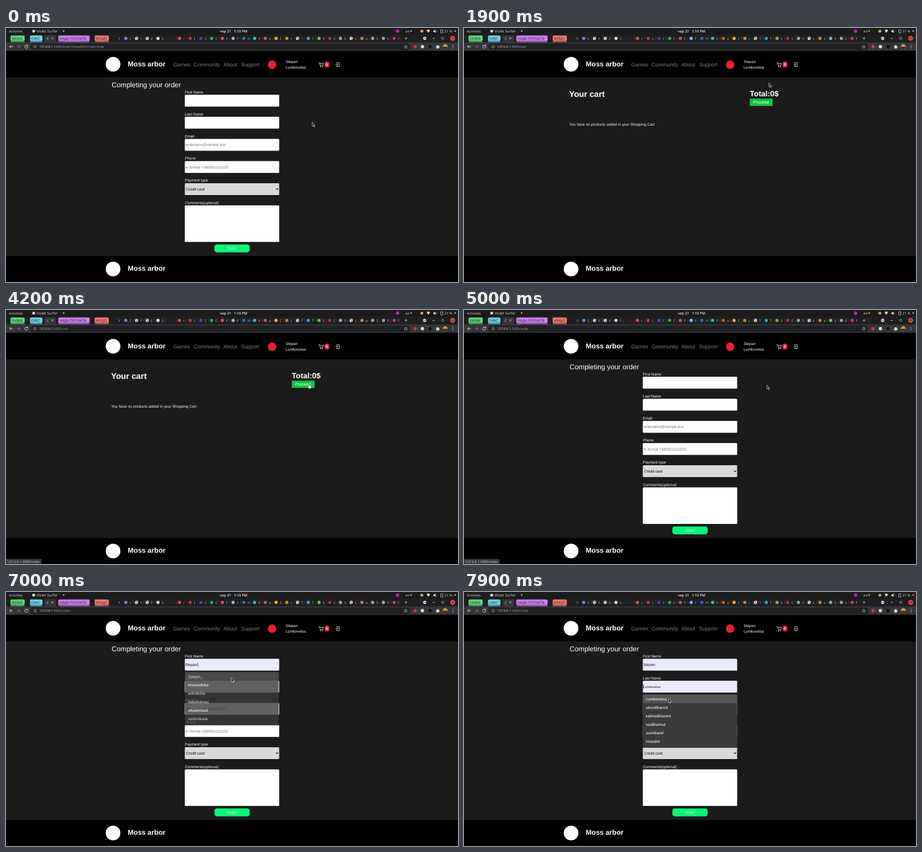
An HTML page that plays this animation: 800 by 450 pixels, repeating every 8000 ms.

```html
<!DOCTYPE html>
<html lang="en">
<head>
<meta charset="utf-8">
<title>Order form</title>
<style>
html, body { margin: 0; width: 100%; height: 100%; overflow: hidden; background: #000; }
svg { display: block; width: 100vw; height: 100vh; }
text { font-family: "Liberation Sans", Arial, sans-serif; white-space: pre; text-rendering: geometricPrecision; }
.ui { font-family: "Open Sans", "Noto Sans", sans-serif; }
</style>
</head>
<body>
<svg id="stage" viewBox="0 0 800 450"></svg>
<script>
const LOOP = 8000;
const FIRST = "Stepan", LAST = "Lumkovetsa", SHOP = "Moss arbor";
const stage = document.getElementById("stage");

const rect = (x, y, w, h, fill, r = 0, extra = "") =>
  `<rect x="${x}" y="${y}" width="${w}" height="${h}" rx="${r}" fill="${fill}" ${extra}/>`;
const disc = (x, y, r, fill) => `<circle cx="${x}" cy="${y}" r="${r}" fill="${fill}"/>`;
const text = (x, y, size, fill, s, extra = "") =>
  `<text x="${x}" y="${y}" font-size="${size}" fill="${fill}" ${extra}>${s}</text>`;
const ui = (x, y, size, fill, s, extra = "") => text(x, y, size, fill, s, 'class="ui" ' + extra);
const line = (d, color, w = 1, extra = "") =>
  `<path d="${d}" fill="none" stroke="${color}" stroke-width="${w}" ${extra}/>`;
const shape = (d, fill) => `<path d="${d}" fill="${fill}"/>`;
const group = (id, body) => `<g id="${id}">${body}</g>`;
const bold = 'font-weight="700"', semi = 'font-weight="600"';

function desktopBar() {
  return rect(0, 0, 800, 12, "#1b1b1b") +
    ui(5, 8, 6, "#ddd", "Activities") +
    disc(49, 5.5, 2.6, "#d9d9d9") +
    ui(54, 8, 6.5, "#ddd", "Violet Surfer") +
    shape("M100 4.5h4l-2 2.6z", "#ccc") +
    ui(378, 8, 6.3, "#eee", "чер 21   1:10 PM", semi) +
    disc(693, 5.5, 3, "#c01fd0") +
    ui(707, 8, 6.2, "#ddd", "en") + shape("M715 4.5h4l-2 2.6z", "#ccc") +
    disc(736, 5.5, 2.6, "#e8a33d") +
    shape("M744.5 4q3-2.4 6 0l-3 4.4z", "#eee") +
    shape("M756.5 4.6h1.5l2-1.8v6l-2-1.8h-1.5z", "#eee") +
    line("M761.3 3.6q1.6 2 0 4", "#ddd", .7) +
    rect(769.5, 3, 3.6, 6, "none", .6, 'stroke="#ddd" stroke-width=".8"') +
    ui(776, 8, 6.2, "#ddd", "21 %") + shape("M793 4.5h4l-2 2.6z", "#ccc");
}

const globe = (x, y) => disc(x, y, 2.8, "#eee") +
  shape(`M${x - 2} ${y - 1.2}l2-.8 .6 1.2-1.2 1zM${x + .2} ${y + .4}l1.8-.4-.6 1.8-1 .4z`, "#444");

function tabStrip() {
  const labels = [
    [8, 25, "#5fd577", "КАЗКА"], [42.5, 22, "#6ad3ec", "ОФІС"],
    [92.5, 55.5, "#cf7df0", "НАДА ПРОЧИТА"], [157, 25, "#ee7770", "КІНЦО"]
  ];
  const letters = "CYES-rLCCFFHVaCcTTSCSLaSEF";
  const colors = ("#5b8def #eee #eee #ddd #222 #e0533d #c92f3c #5b36c9 #31a866 #e0533d #8ab4f8 #3b5fd9 " +
    "#2fc4b2 #e0533d #f5b02e #d9822b #eee #2ca5e0 #7fba3c #d0212b #8fae96 #eee #d9822b #8fae96 #8fae96 #d9305f").split(" ");
  let s = rect(0, 12, 800, 14, "#1e1f21") + rect(68, 12.5, 20.5, 14, "#35363a", 2);
  for (const [x, w, c, label] of labels)
    s += rect(x, 13.2, w, 10, c, 2) + rect(x, 24, w, 1, c) + ui(x + 2, 20.8, 6.3, "#222", label);
  s += ui(72, 20.6, 6, "#ddd", "C") +
    line("M80.3 16.5l3.4 3.4m0-3.4l-3.4 3.4", "#ddd", .8) + ui(199, 20.6, 6, "#bbb", "Y");
  [...letters].forEach((ch, i) => {
    const x = 212 + i * 19;
    s += (colors[i] === "#eee" ? globe(x, 18.4) : disc(x, 18.4, 2.8, colors[i])) + ui(x + 6.5, 20.6, 6, "#bbb", ch);
    if (i) s += rect(x - 6, 15.5, .5, 6, "#555");
  });
  return s + line("M705.5 18.4h5m-2.5-2.5v5", "#ccc", .8) +
    disc(741, 18.4, 2.8, "#ddd") + rect(739.6, 17.9, 2.8, 1, "#333") +
    line("M755 18.6h4", "#ddd", .8) + line("M773 16l2.4 2.4-2.4 2.4-2.4-2.4z", "#ddd", .8) +
    disc(790.5, 18.4, 4.4, "#e0463a") + line("M789 16.9l3 3m0-3l-3 3", "#222", .8);
}

function toolbar() {
  return rect(0, 25.5, 800, 15, "#35363a") + rect(43, 27.5, 673, 11.3, "#202124", 5.6) +
    line("M12 33H6.5m2.6-2.7L6.4 33l2.7 2.7", "#ddd") +
    line("M19.5 33H25m-2.6-2.7L25.1 33l-2.7 2.7", "#777") +
    group("reload", line("M38.2 31.6a2.7 2.7 0 1 0 .3 2.2M38.6 29.8v2.2h-2.2", "#ddd")) +
    group("stop", line("M33.6 30.8l4.4 4.4m0-4.4l-4.4 4.4", "#ddd")) +
    `<circle cx="51.5" cy="33" r="2.5" fill="none" stroke="#aaa" stroke-width=".8"/>` + rect(51.1, 32.6, .8, 2, "#aaa") +
    `<text class="ui" x="59" y="35.2" font-size="5.7" fill="#eee">127.0.0.1<tspan id="url" fill="#9aa0a6"></tspan></text>` +
    line("M707.5 30.2l.9 1.9 2 .2-1.5 1.4.4 2.1-1.8-1-1.8 1 .4-2.1-1.5-1.4 2-.2z", "#ccc", .7) +
    disc(724, 33, 3, "#d8332c") + disc(737, 33, 3, "#e3d9d9") + disc(750.5, 33, 2.9, "#111") +
    shape("M761.5 31.3h1.6q.9-2.6 1.8 0h1.6v1.6q2.4.9 0 1.8v1.6h-5z", "#ddd") +
    disc(777.5, 33, 4.4, "#c9964f") + shape("M773.3 33.5h8.4a4.3 4.3 0 0 1-8.4 0z", "#2b2420") +
    [30.5, 33, 35.5].map(y => disc(791, y, .7, "#ddd")).join("");
}

function header() {
  const links = [[296, "Games"], [332, "Community"], [385, "About"], [416, "Support"]];
  return rect(0, 40.5, 800, 47, "#000") + disc(189.5, 64.3, 13, "#fff") +
    text(215.5, 67.5, 12.4, "#fff", SHOP, bold) +
    links.map(([x, s]) => text(x, 67.6, 9.3, "#7f7f7f", s)).join("") +
    disc(471, 65, 7.5, "#e0232e") +
    text(495, 62, 6.7, "#fff", FIRST) + text(495, 72, 6.7, "#fff", LAST) +
    line("M553 61.3h1.7l1.5 5h4.6l1-3.7h-6.6", "#fff", .8) + disc(556.8, 68.5, .9, "#fff") + disc(560.3, 68.5, .9, "#fff") +
    rect(563.7, 59.5, 8.7, 10.6, "#dc1f35", 3.5) + text(568, 67.4, 7, "#fff", "0", bold + ' text-anchor="middle"') +
    line("M585.3 63.3v-1.6h4.6v6.8h-4.6v-1.6M583.4 65.1h4m-1.4-1.5l1.5 1.5-1.5 1.5", "#fff", .8);
}

function orderPage() {
  const field = (id, y, h, fill = "#fffffd") => rect(316.5, y, 167, h, fill, 1.5, `id="${id}"`);
  const labels = ["First Name", "Last Name", "Email", "Phone", "Payment type", "Comments(optional)"];
  return text(187, 105, 12.4, "#fff", "Completing your order") +
    labels.map((s, i) => text(316.7, 115.5 + i * 39.2, 6.67, "#fff", s)).join("") +
    field("first", 118.2, 21) + field("last", 157.3, 21) + field("mail", 196.5, 21) + field("phone", 235.7, 21) +
    field("pay", 275, 21, "#d9d9d7") + field("notes", 314.2, 64.8) +
    text(317.5, 209.4, 6.67, "#757575", "writename@sample.test") +
    text(317.5, 248.5, 6.67, "#757575", "In format +380001112233") +
    text(319, 288, 6.67, "#000", "Credit card") + line("M477.8 284.4l2 2 2-2", "#111", 1.1) +
    rect(368.8, 383.4, 62.6, 14, "#0df477", 4.5) + text(400, 392.7, 6.8, "#d9ffe9", "Order", 'text-anchor="middle"') +
    text(317.3, 130.8, 6.67, "#111", FIRST, 'id="firstText"') +
    text(317.8, 170.2, 5.5, "#111", LAST, 'id="lastText"') +
    rect(0, 0, .6, 7, "#000", 0, 'id="caret"');
}

function cartPage() {
  return text(186, 121.8, 14.6, "#fff", "Your cart", bold) + text(505.8, 120.8, 13.6, "#fff", "Total:0$", bold) +
    rect(505.8, 125.2, 40.4, 12.8, "#0dc640") + text(511.8, 134.2, 7.5, "#fff", "Proceed") +
    text(186.3, 172.7, 6.67, "#fff", "You have no products added in your Shopping Cart");
}

function popup(id, x, y, w, items) {
  return group(id, rect(x, y, w, 95, "#3a3a3a") +
    rect(x, y + 1, w, 15, "#565656", 0, `id="${id}Hover"`) +
    items.map((s, i) => ui(x + 5.3, y + 11 + i * 15, 6.4, "#f4f4f4", s, semi)).join(""));
}

stage.innerHTML = rect(0, 0, 800, 450, "#1c1b1a") + desktopBar() + tabStrip() + toolbar() + header() +
  rect(0, 404, 800, 46, "#000") + disc(189.5, 427, 13, "#fff") + text(215.5, 430, 12.4, "#fff", SHOP, bold) +
  group("order", orderPage()) + group("cart", cartPage()) +
  popup("firstList", 317, 141.3, 165.6, [FIRST, "kmasndnka", "adkslkdsk", "lsakdkdmas", "alksdmlasd", "asldmlkads"]) +
  popup("lastList", 316.4, 181, 167.2, [LAST, "aksndlkansd", "kalmsdklasdm", "lasdlkamsd", "asmldasld", "lmasdld"]) +
  group("status", rect(-2, 441, 0, 11, "#35363a", 1.5, 'id="statusBox"') + ui(2, 447.5, 6, "#e4e4e4", "", 'id="statusText"')) +
  group("arrow", `<path d="M0 0v7l1.6-1.4 1.2 2.6 1.3-.6-1.2-2.5h2.2z" fill="#111" stroke="#eee" stroke-width=".7"/>`) +
  group("hand", `<path d="M-1-2.5q.9-1 1.6 0v3l3 .6q1.2.5.9 2.2l-.7 2.9h-3.9l-2.7-3.2q-.2-1.2 1.8 0z" fill="#fff" stroke="#111" stroke-width=".5"/>`) +
  group("beam", line("M-1.5-3.5q1.5 0 1.5 1v5q0 1-1.5 1M1.5-3.5q-1.5 0-1.5 1m0 5q0 1 1.5 1", "#444", .8));

const el = id => document.getElementById(id);
const show = (id, on) => el(id).setAttribute("display", on ? "inline" : "none");

// time, x, y
const path = [
  [500, 542, 167], [900, 551, 110], [1200, 559, 67], [1650, 559, 67], [2000, 535, 105],
  [2500, 472, 183], [3000, 440, 206], [3300, 437, 200], [3500, 437, 200], [3900, 500, 160],
  [4200, 536, 133], [5000, 536, 133], [5500, 490, 140], [6100, 432, 128], [6500, 430, 128],
  [6800, 402, 150], [7000, 399, 152], [7300, 368, 168], [7600, 367, 168], [7800, 362, 189]
];

function pointer(t) {
  const i = path.findIndex(p => p[0] > t);
  if (i < 0) return path[path.length - 1].slice(1);
  if (!i) return path[0].slice(1);
  const [a, b] = [path[i - 1], path[i]];
  const k = (t - a[0]) / (b[0] - a[0]), e = k * k * (3 - 2 * k);
  return [a[1] + (b[1] - a[1]) * e, a[2] + (b[2] - a[2]) * e];
}

function draw(time) {
  const t = Math.floor(time % LOOP / 100) * 100;
  const between = (a, b) => t >= a && t < b;
  const onCart = between(1700, 4900);
  const [x, y] = pointer(t);
  const inside = (l, top, r, bottom) => x >= l && x <= r && y >= top && y <= bottom;

  show("cart", onCart);
  show("order", !onCart);
  const loading = between(1500, 1800) || between(4400, 5000);
  show("stop", loading);
  show("reload", !loading);
  el("url").textContent = ":5000/" + (onCart ? "cart" : t < 1700 ? "order?showAlertOrder=true" : "order");

  const toCart = between(1200, 1900), toOrder = between(4100, 5400);
  show("status", toCart || toOrder);
  el("status").setAttribute("opacity", t === 1200 ? .6 : 1);
  el("statusText").textContent = "127.0.0.1:5000/" + (toCart ? "cart" : "order");
  el("statusBox").setAttribute("width", toCart ? 60 : 65);

  show("firstList", between(6500, 7100));
  el("firstList").setAttribute("opacity", t >= 7000 ? .8 : 1);
  show("firstListHover", t >= 6800);
  show("lastList", t >= 7500);
  show("lastListHover", t >= 7800);

  const filled = "#e8ebfb", blank = "#fffffd";
  el("first").setAttribute("fill", t >= 6800 ? filled : blank);
  el("last").setAttribute("fill", t >= 7800 ? filled : blank);
  show("firstText", t >= 6800);
  el("firstText").setAttribute("font-size", t < 7000 ? 5.5 : 6.67);
  show("lastText", t >= 7800);
  show("caret", t >= 6200);
  el("caret").setAttribute("x", between(7000, 7300) ? 339 : 317.4);
  el("caret").setAttribute("y", t < 7300 ? 125 : 164.5);

  const kind = inside(552, 58, 573, 72) || onCart && inside(506, 125, 546, 138) ? "hand"
    : !onCart && (inside(317, 118, 483, 139) || inside(317, 157, 483, 178)) ? "beam" : "arrow";
  for (const id of ["arrow", "hand", "beam"]) show(id, id === kind);
  el(kind).setAttribute("transform", `translate(${x.toFixed(2)} ${y.toFixed(2)})`);
}

const start = performance.now();
function tick() {
  draw(performance.now() - start);
  requestAnimationFrame(tick);
}
tick();
</script>
</body>
</html>
```
